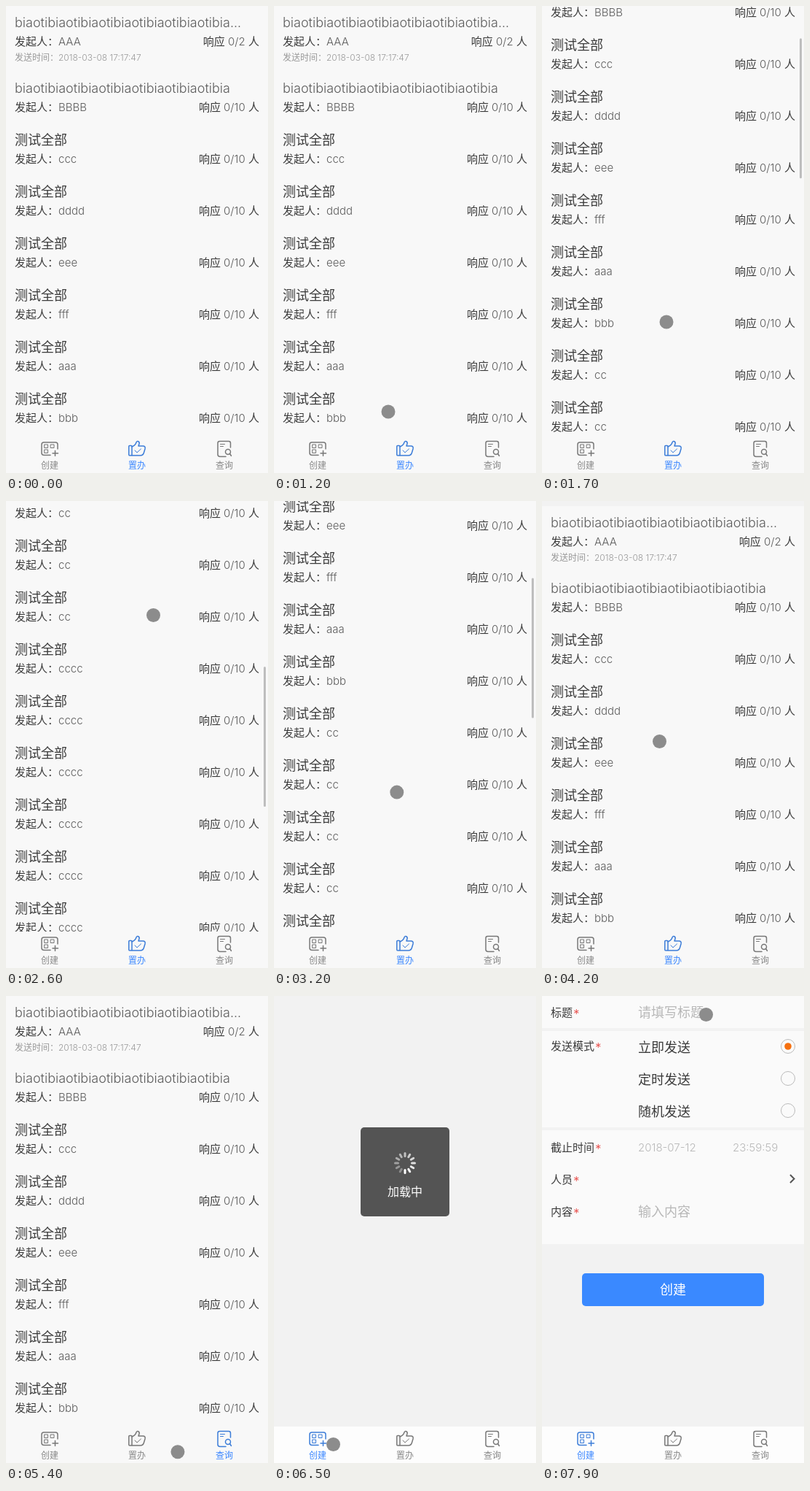
Animation of 360x640 px, one loop 8 s. Source, as an HTML page:

```html
<!DOCTYPE html>
<html lang="zh-CN">
<head>
<meta charset="utf-8">
<style>
html, body { margin: 0; width: 100%; height: 100%; overflow: hidden; background: #f2f2f2; }
svg { display: block; width: 100%; height: 100%; }
text { font: 300 15px Inter, "Noto Sans CJK SC", "Noto Sans CJK", sans-serif; font-optical-sizing: none; }
.icon { fill: none; stroke-width: 1.5; stroke-linecap: round; stroke-linejoin: round; }
.tab { stroke: #777; }
.tab text { fill: #888; stroke: none; }
.tab.on { stroke: #3b7cd8; }
.tab.on text { fill: #3a86ff; }
</style>
</head>
<body>
<svg viewBox="0 0 360 640">
  <g id="list"></g>
  <rect id="bar" x="354" width="3" height="192" rx="1.5" fill="#bebebe"/>
  <g id="form"></g>
  <g id="loading"></g>
  <rect id="dock" y="590" width="360" height="50"/>
  <g id="tabs"></g>
  <circle id="dot" r="9.5" fill="#8c8c8c"/>
</svg>
<script>
const LOOP = 8000, INK = '#3a3a3a', LATIN = '#5c5c5c', HINT = '#b8b8b8';
const $ = id => document.getElementById(id);
const times = (n, make) => Array.from({ length: n }, (_, i) => make(i)).join('');

// y is the visual middle of the line; ASCII runs are paler
function text(x, y, size, str, color = INK, anchor = 'start') {
  const runs = color === INK ? str.replace(/[ -~]+/g, s => `<tspan fill="${LATIN}">${s}</tspan>`) : str;
  return `<text x="${x}" y="${y + size * 0.37}" fill="${color}" text-anchor="${anchor}" style="font-size:${size}px">${runs}</text>`;
}
const rect = (x, y, w, h, more = '') => `<rect x="${x}" y="${y}" width="${w}" height="${h}" ${more}/>`;
const fill = color => `fill="${color}"`;

// Scrolling list
const senders = ['AAA', 'BBBB', 'ccc', 'dddd', 'eee', 'fff', 'aaa', 'bbb',
  ...Array(4).fill('cc'), ...Array(13).fill('cccc')];
const longTitle = 'biaoti'.repeat(6) + 'bia';
$('list').innerHTML = rect(0, 0, 360, 1830, fill('#f8f8f8')) + times(senders.length, i => {
  const y = i ? 41 + 71 * i : 22;
  const title = i > 1 ? '测试全部' : i ? longTitle : longTitle + '...';
  return text(12, y, 18, title)
    + text(12, y + 26, 15, '发起人：')
    + text(72, y + 26, 15, senders[i])
    + text(348, y + 26, 15, `响应 0/${i ? 10 : 2} 人`, INK, 'end');
}) + text(12, 71, 12, '发送时间：', '#999') + text(72, 71, 12, '2018-03-08 17:17:47', '#999');

// Form page
const label = (y, str) => text(12, y, 15, str) + text(43, y + 3, 17, '*', '#e64340')
  .replace('x="43"', `x="${13 + 15 * str.length}"`);
const modes = ['立即发送', '定时发送', '随机发送'];
$('form').innerHTML =
  rect(0, 0, 360, 44, fill('#fafafa')) + rect(0, 48, 360, 132, fill('#fafafa')) + rect(0, 184, 360, 156, fill('#fafafa'))
  + rect(132, 48, 216, 44, 'id="press" fill="#ececec"')
  + label(22, '标题') + label(68, '发送模式') + label(207, '截止时间') + label(251, '人员') + label(295, '内容')
  + text(132, 22, 18, '请填写标题', HINT) + text(132, 295, 18, '输入内容', HINT)
  + text(132, 207, 15, '2018-07-12', HINT) + text(262, 207, 15, '23:59:59', HINT)
  + times(3, i => text(132, 70 + 44 * i, 18, modes[i])
    + `<circle cx="338" cy="${69 + 44 * i}" r="9.5" fill="none" stroke="#bbb"/>`)
  + '<circle cx="338" cy="69" r="4.8" fill="#f5700f"/>'
  + '<path d="M341 245l5.5 5.5-5.5 5.5" fill="none" stroke="#555" stroke-width="2"/>'
  + rect(55, 380, 250, 45, 'rx="5" fill="#3a89ff"') + text(180, 402, 18, '创建', '#fff', 'middle');

// Loading box
$('loading').innerHTML = rect(119, 180, 122, 122, 'rx="5" fill="#545454"')
  + `<g id="spinner" stroke="#fff" stroke-width="3" stroke-linecap="round">${
    times(12, i => `<path d="M180 215.5v4" transform="rotate(${30 * i} 180 229)"/>`)}</g>`
  + text(180, 268, 16, '加载中', '#fff', 'middle');

// Tab bar
const path = (d, width = 1.5) => `<path d="${d}" stroke-width="${width}"/>`;
const icons = [
  path('M61 615.5H52q-3 0-3-3V601q0-3 3-3h16q3 0 3 3v6M67.5 609.5v7M64 613h7.5')
    + times(3, i => rect(53 + 8.5 * (i % 2), 601 + 7 * (i >> 1), 4.5, 4.5, 'stroke-width="1"')),
  rect(168.8, 602.5, 4.2, 13.5, 'rx="1"') + path('M173 604q5-2 6-6c1-3 5-1 4 2l-1 3h6q4 0 3 4l-1.500 5q-1 4-5 4H173')
    + path('M177 609l3 3 5.5-5', 1),
  path('M308.500 605v-6q0-2.500-2.500-2.500h-12.500q-2.500 0-2.500 2.500v15.500q0 3 3 3h8M307.500 613.500l2 3')
    + path('M294.500 600.500h6M294.500 603.500h4', 1) + '<circle cx="305" cy="611" r="3.5"/>'
];
const names = ['创建', '置办', '查询'];
$('tabs').innerHTML = times(3, i =>
  `<g class="tab"><g class="icon">${icons[i]}</g>${text(60 + 120 * i, 630, 12, names[i], '#888', 'middle')}</g>`);

// Each move: start, duration, then the value it eases to; values hold in between
const scrolls = [[0, 0, 0], [1355, 1245, 690], [2600, 1180, -36], [3780, 585, 0]];
const touches = [
  [100, 0, 314, 92], [100, 200, 198.5, 165.5], [500, 100, 158.5, 184],
  [1200, 0, 157, 556], [1355, 935, 202.5, 156.5], [2600, 900, 157, 484], [3600, 500, 161.5, 329.5],
  [4700, 0, 283, 627], [5300, 300, 101.5, 618.5], [5700, 100, 81.5, 614.5],
  [6800, 600, 245.5, 82.5], [7800, 100, 225.5, 25.5]
];
const smooth = p => p * p * (3 - 2 * p);

function at(moves, t) {
  return moves.filter(m => m[0] <= t).reduce((from, [start, length, ...to]) => {
    const p = length ? smooth(Math.min(1, (t - start) / length)) : 1;
    return to.map((v, i) => p < 1 ? from[i] + (v - from[i]) * p : v);
  }, []);
}
const set = (id, values) => Object.entries(values).forEach(([k, v]) => $(id).setAttribute(k, v));
const show = (id, on) => set(id, { display: on ? 'inline' : 'none' });
const within = (t, from, to) => t >= from && t < to;

function draw(t) {
  const [off] = at(scrolls, t);
  const busy = within(t, 4700, 5000) || within(t, 6000, 6600);
  const listed = t < 6000 && !busy;
  const touched = within(t, 100, 700) || within(t, 1200, 4500) || t >= 4700;
  show('list', listed);
  show('form', t >= 6600);
  show('loading', busy);
  show('press', t === 7600);
  show('bar', within(t, 1400, 4000));
  show('dot', touched);
  set('list', { transform: `translate(0 ${-off})` });
  set('bar', { y: 2 + Math.max(0, off) * 0.326 });
  set('dock', { fill: listed ? '#f8f8f8' : '#fdfdfd' });

  const active = t < 4700 ? 1 : t < 6000 ? 2 : 0;
  [...$('tabs').children].forEach((tab, i) => tab.classList.toggle('on', i === active));
  const head = Math.floor(t % 1000 * 12 / 1000);
  [...$('spinner').children].forEach((spoke, i) =>
    spoke.setAttribute('stroke-opacity', 1 - 0.06 * ((head - i + 12) % 12)));

  if (touched) {
    const [cx, cy] = at(touches, t);
    set('dot', { cx, cy });
  }
}

// The screen refreshes ten times a second
const start = performance.now();
function tick() {
  draw(Math.floor((performance.now() - start) % LOOP / 100) * 100);
  requestAnimationFrame(tick);
}
tick();
</script>
</body>
</html>
```
